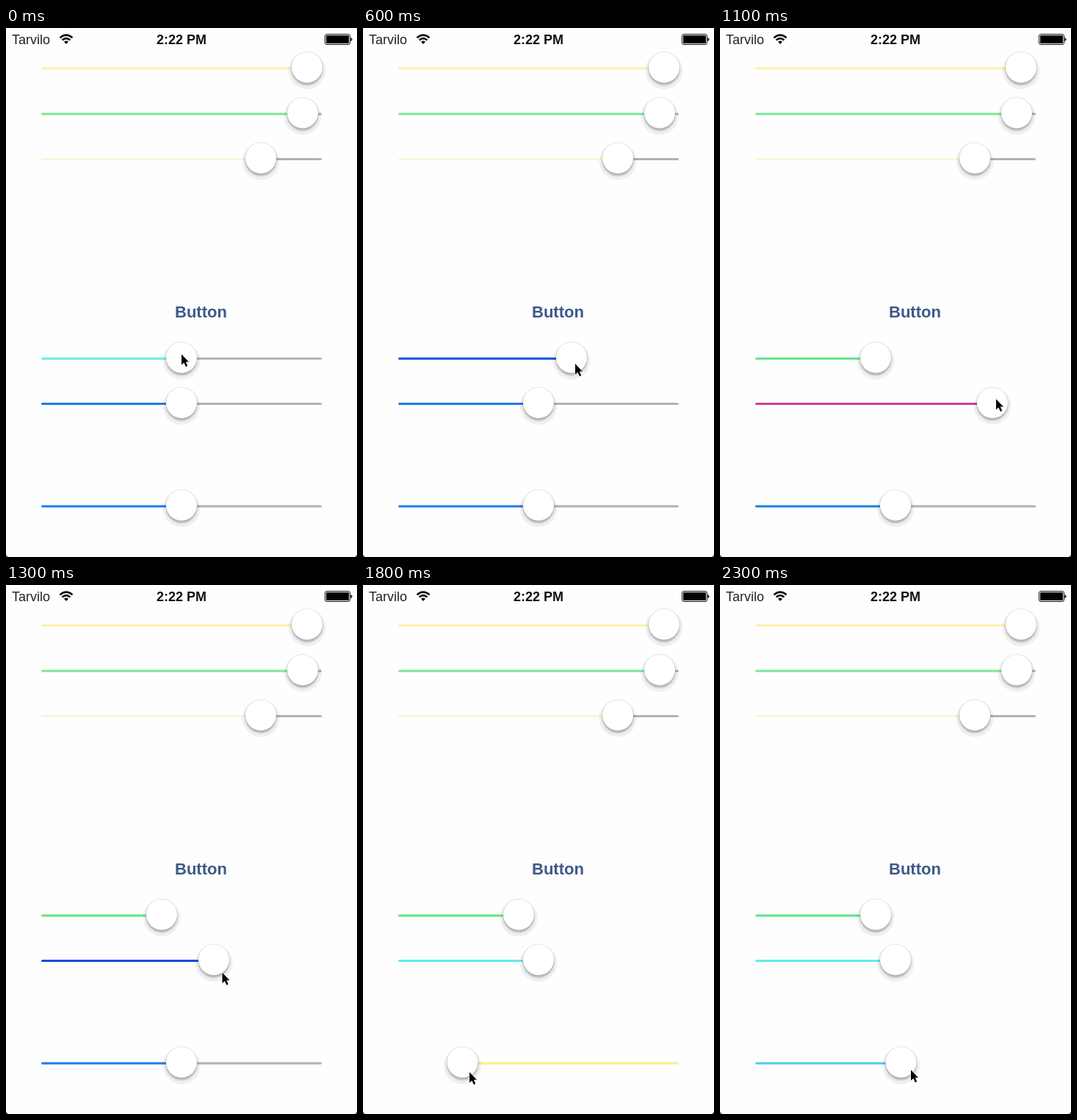
An HTML page for the animation above (2.4 s loop, 478x720 px).

```html
<!DOCTYPE html>
<html lang="en">
<head>
<meta charset="utf-8">
<title>Colour sliders</title>
<style>
  html, body { margin: 0; width: 100%; height: 100%; overflow: hidden; background: #fefefe; }
  svg { display: block; width: 478px; height: 720px; }
  text { font-family: "Liberation Sans", Arial, sans-serif; font-size: 18px; fill: #222; }
</style>
</head>
<body>
<svg viewBox="0 0 478 720">
  <defs>
    <filter id="soft" x="-30%" y="-30%" width="160%" height="160%"><feGaussianBlur stdDeviation="1.3"/></filter>
    <g id="thumb">
      <circle cy="4.5" r="25.5" fill-opacity=".055"/>
      <circle cy="3" r="21.3" fill-opacity=".25" filter="url(#soft)"/>
      <circle r="21.2" fill="#fff" stroke="#000" stroke-opacity=".12" stroke-width=".8"/>
    </g>
  </defs>
  <rect width="478" height="720" fill="#fefefe"/>
  <text x="8" y="22">Tarvilo</text>
  <text x="239" y="22" text-anchor="middle" font-weight="bold" style="fill:#111">2:22 PM</text>
  <g fill="none" stroke="#111" stroke-width="2.6">
    <path d="M73.5 13.4Q82 5.8 90.5 13.4M76.6 16.5Q82 11.8 87.4 16.5"/>
    <path d="M82 22L79 18.8Q82 16.4 85 18.8Z" fill="#111" stroke="none"/>
  </g>
  <rect x="434.5" y="8.5" width="34" height="14" rx="2.5" fill="none" stroke="#111"/>
  <rect x="436" y="10" width="31" height="11" rx="1"/>
  <path d="M469.5 13Q471.5 13.5 471.5 15.5T469.5 18Z"/>
  <text x="230" y="394" font-weight="bold" style="font-size:22px;fill:#3d5a87">Button</text>
  <g id="sliders"></g>
  <path d="M0 717V720H3ZM478 717V720H475Z" fill="#555"/>
  <path id="cursor" d="M0 0V14.5L3.3 11.5 5.9 17 8.2 16 5.8 10.6H10Z" stroke="#fff" stroke-width="1.2" paint-order="stroke"/>
</svg>
<script>
const LOOP = 2400, STEP = 100, LEFT = 48, RIGHT = 430;
const GREY = [178, 178, 178], BLUE = [26, 127, 230], WHITE = [254, 254, 254];

// Linear interpolation over rows of [key, ...values].
function sample(rows, k) {
  const i = rows.findIndex(row => row[0] > k);
  if (i === 0) return rows[0].slice(1);
  if (i < 0) return rows[rows.length - 1].slice(1);
  const a = rows[i - 1], b = rows[i], u = (k - a[0]) / (b[0] - a[0]);
  return a.slice(1).map((v, j) => v + (b[j + 1] - v) * u);
}

const rgb = c => `rgb(${c.map(Math.round)})`;

// Fill colour by thumb position.
const spectrum = [
  [135, ...WHITE], [175, 200, 236, 120], [210, 98, 226, 126], [239, 100, 236, 234],
  [246, 78, 208, 236], [284, 12, 78, 218], [328, 128, 60, 205], [371, 212, 58, 164]
];

const sliders = [
  { y: 55, x: [[0, 410]], fill: [252, 241, 172] },
  { y: 117, x: [[0, 404]], fill: [124, 232, 152] },
  { y: 178.5, x: [[0, 347]], fill: [251, 246, 212] },
  { y: 450, touched: 0,
    x: [[0, 239], [300, 210.5], [600, 284], [800, 212]],
    rest: [[0, ...GREY], [300, 240, 194, 124], [600, ...WHITE]] },
  { y: 511.5, touched: 900,
    x: [[900, 239], [1100, 371], [1400, 239]],
    rest: [[900, ...GREY], [1100, ...WHITE]] },
  { y: 651, touched: 1600,
    x: [[1500, 239], [1800, 135.5], [2300, 246.5]],
    rest: [[1500, ...GREY], [1800, 252, 240, 130], [2300, ...WHITE]] }
];

const pointer = [
  [0, 239, 444], [300, 242, 437], [600, 289, 457], [900, 244, 505], [1100, 376, 505],
  [1200, 345, 533], [1400, 244, 522], [1500, 251, 638], [1800, 145, 663], [2300, 260, 660]
];

function add(parent, name, attrs) {
  const node = document.createElementNS("http://www.w3.org/2000/svg", name);
  for (const key in attrs) node.setAttribute(key, attrs[key]);
  return parent.appendChild(node);
}

const group = document.getElementById("sliders");
const cursor = document.getElementById("cursor");
for (const s of sliders) {
  const line = { y1: s.y, y2: s.y, "stroke-width": 3, "stroke-linecap": "round" };
  s.right = add(group, "line", { ...line, x2: RIGHT - 1.5 });
  s.left = add(group, "line", { ...line, x1: LEFT + 1.5 });
  s.thumb = add(group, "use", { href: "#thumb" });
}

function draw(t) {
  for (const s of sliders) {
    const [x] = sample(s.x, t);
    const fill = s.fill || (t >= s.touched ? sample(spectrum, x) : BLUE);
    s.left.setAttribute("x2", x);
    s.left.setAttribute("stroke", rgb(fill));
    s.right.setAttribute("x1", x);
    s.right.setAttribute("stroke", rgb(s.rest ? sample(s.rest, t) : GREY));
    s.thumb.setAttribute("transform", `translate(${x} ${s.y - 1.5})`);
  }
  cursor.setAttribute("transform", `translate(${sample(pointer, t)})`);
}

const start = performance.now();
function tick() {
  const t = (performance.now() - start) % LOOP;
  draw(Math.floor(t / STEP) * STEP);
  requestAnimationFrame(tick);
}
tick();
</script>
</body>
</html>
```
